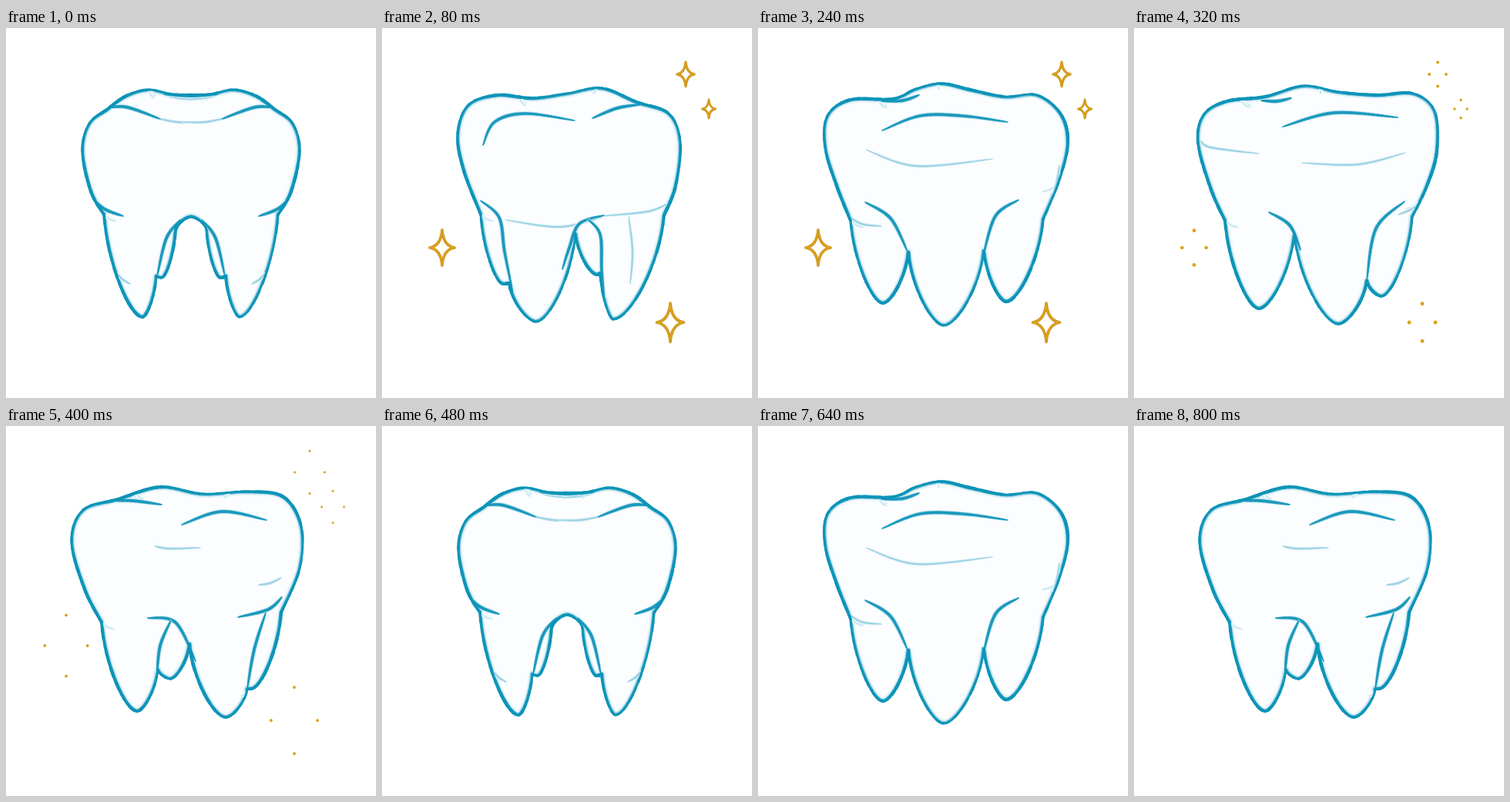
These frames come from a looping animation (480x480 px, 880 ms). An HTML page with a canvas:

```html
<!DOCTYPE html>
<html lang="en">
<head>
<meta charset="utf-8">
<title>Sparkling tooth</title>
<style>
html, body { margin: 0; width: 100%; height: 100%; overflow: hidden; background: #fff; }
canvas { display: block; width: 480px; height: 480px; }
</style>
</head>
<body>
<canvas id="stage" width="480" height="480"></canvas>
<script>
const ctx = document.getElementById('stage').getContext('2d');
const STEP = 80;
const TURN = 'front left quarter back right side front quarter back right side'.split(' ');
const PAPER = [251, 253, 255], TEAL = [14, 148, 184];
const GOLD = '#dca21c', GOLD_EDGE = '#c08a14';

// crown: key points from neck to neck over the top.
// feet: root tips and the gaps between them, right to left.
const POSES = {
  front: {
    mirror: true,
    crown: '127,242 110,212 99,160 108,124 132,105 156,88 185,80 215,86 240,87',
    feet: '240,245 220,262 202,324 195,322 177,375',
    folds: ['134,103 158,103 200,118', '226,249 208,273 196,322', '112,221 128,235 152,244',
      '205,86 240,88 275,86'],
    creases: ['190,116 222,122 250,122', '208,88 225,91 246,93', '144,318 151,326 161,332']
  },
  left: {
    crown: `128,242 106,185 98,138 112,100 150,87 195,91 240,85 285,78 330,96 372,111
      387,148 381,205 366,243`,
    feet: '300,378 283,318 279,320 251,267 200,381 165,331 157,332',
    folds: ['131,152 146,122 185,111 250,120', '273,117 305,104 337,99',
      '128,224 152,246 159,290 170,345', '288,243 256,254 243,285 234,313',
      '266,247 283,268 285,315 289,360'],
    creases: ['160,249 230,258 285,246', '285,244 345,238 372,227', '320,245 325,290 322,332']
  },
  quarter: {
    crown: `121,243 103,210 88,165 88,120 112,95 165,92 205,81 245,72 285,81 330,90 372,96
      396,130 394,182 372,240`,
    feet: '319,358 298,308 285,320 268,298 220,386 183,312 162,336',
    folds: ['157,185 163,143 190,119 270,115 318,103', '130,217 164,246 183,312',
      '329,225 287,245 268,300', '281,254 294,278 299,312'],
    creases: ['211,125 227,143 236,167', '359,105 366,123 367,143', '386,194 379,205 369,213']
  },
  back: {
    crown: `120,250 102,205 87,155 90,114 120,93 175,92 205,79 238,72 275,80 320,89 362,87
      393,112 402,150 390,200 370,248`,
    feet: '322,355 293,289 241,386 195,291 162,357',
    folds: ['139,226 172,247 194,290', '338,223 308,244 292,296',
      '161,133 210,114 265,114 324,122', '160,95 188,94 209,87'],
    creases: ['140,158 205,179 304,170', '115,242 134,254 160,257', '383,214 388,198 391,178']
  },
  right: {
    crown: `118,250 100,210 83,150 90,113 120,95 170,89 220,75 265,83 315,87 362,85 390,108
      393,160 380,205 361,245`,
    feet: '321,348 302,328 265,384 208,267 162,364',
    folds: ['175,239 202,256 216,288', '351,225 314,260 302,327', '193,128 260,110 342,116',
      '165,94 185,95 204,91'],
    creases: ['218,175 290,177 352,162', '86,146 100,155 162,163', '365,232 356,237 343,242']
  },
  side: {
    crown: `124,255 102,212 85,150 100,109 145,95 200,79 255,88 315,85 360,92 383,130
      381,185 357,242`,
    feet: '318,341 313,341 285,378 238,283 213,328 197,316 170,370',
    folds: ['184,249 220,255 246,305', '214,252 200,285 196,322', '228,128 280,111 338,122',
      '301,248 340,238 358,222', '337,242 322,290 313,341', '138,97 165,97 202,102'],
    creases: ['193,156 212,159 252,158', '328,206 342,204 357,197']
  }
};

// Sparkles: centre and half height.
const STARS = [[394, 60, 16], [424, 105, 12], [78, 285, 23], [374, 382, 25]];

const parse = text => text.trim().split(/\s+/).map(t => t.split(',').map(Number));
const flip = pts => pts.map(([x, y]) => [480 - x, y]);
const tint = a => `rgb(${PAPER.map((c, i) => Math.round(c + (TEAL[i] - c) * a))})`;

function random(seed) {
  return () => (seed = (seed * 16807) % 2147483647) / 2147483647;
}

function bezier(a, b, c, d) {
  return Array.from({ length: 16 }, (_, k) => {
    const t = k / 16, s = 1 - t;
    return [0, 1].map(j =>
      s * s * s * a[j] + 3 * s * s * t * b[j] + 3 * s * t * t * c[j] + t * t * t * d[j]);
  });
}

// Smooth open curve through all points.
function spline(pts) {
  const n = pts.length - 1, out = [];
  const at = i => pts[Math.max(0, Math.min(n, i))];
  for (let i = 0; i < n; i++) {
    const [a, b, c, d] = [at(i - 1), at(i), at(i + 1), at(i + 2)];
    out.push(...bezier(b, b.map((v, j) => v + (c[j] - a[j]) / 6),
      c.map((v, j) => v - (d[j] - b[j]) / 6), c));
  }
  return [...out, pts[n]];
}

// One flank of a root: steep at the top, level at the tip.
function flank([x, y], [tx, ty]) {
  const dx = tx - x, dy = ty - y;
  return bezier([x, y], [x + 0.08 * dx, y + 0.47 * dy], [tx - 0.33 * dx, ty], [tx, ty]);
}

function build({ mirror, crown, feet, folds, creases }) {
  let top = parse(crown), low = parse(feet);
  if (mirror) {
    top = [...top, ...flip(top.slice(0, -1)).reverse()];
    low = [...flip(low.slice(1)).reverse(), ...low];
  }
  const edge = spline(top);
  const stops = [top[top.length - 1], ...low, top[0]];
  for (let i = 1; i < stops.length; i += 2) {
    const [a, tip, b] = stops.slice(i - 1, i + 2);
    edge.push(...flank(a, tip), tip, ...flank(b, tip).reverse());
  }
  const lines = list => list.map(parse)
    .flatMap(p => mirror ? [p, flip(p)] : [p]).map(spline);
  return { edge, folds: lines(folds), creases: lines(creases) };
}

function trace(pts) {
  ctx.beginPath();
  for (const [x, y] of pts) ctx.lineTo(x, y);
}

// Soft brush line, thin at both ends.
function ink(pts, width, strength) {
  const n = pts.length - 1;
  for (const [grow, fade] of [[3, 0.15], [1.2, 0.5], [0, 1]]) {
    ctx.strokeStyle = tint(strength * fade);
    for (let i = 0; i < n; i++) {
      const swell = Math.sin(Math.PI * (i + 0.5) / n) ** 0.6;
      ctx.lineWidth = (width + grow) * (0.25 + 0.75 * swell);
      trace([pts[i], pts[i + 1]]);
      ctx.stroke();
    }
  }
}

function drawTooth({ edge, folds, creases }) {
  const rnd = random(71), n = edge.length;
  ctx.save();
  trace(edge);
  ctx.closePath();
  ctx.fillStyle = tint(0);
  ctx.fill();
  ctx.clip();
  for (const [w, a] of [[11, 0.05], [8, 0.16], [6, 0.4], [4.5, 0.7]]) {
    ctx.strokeStyle = tint(a);
    ctx.lineWidth = w;
    ctx.stroke();
  }
  // Stray brush marks running in from the rim.
  for (let i = 0; i < 7; i++) {
    const [x, y] = edge[Math.floor(rnd() * n)];
    const dx = (240 - x) * 0.14, dy = 6 + rnd() * 6;
    ink(spline([[x, y], [x + dx / 2, y + dy * 0.7], [x + dx, y + dy]]), 1.5, 0.2);
  }
  for (const line of creases) ink(line, 2, 0.4);
  for (const line of folds) ink(line, 3.4, 0.95);
  ctx.restore();

  // Rim of uneven thickness.
  ctx.strokeStyle = tint(1);
  edge.forEach((p, i) => {
    ctx.lineWidth = 3 + 0.6 * Math.sin(i / 9) + rnd() * 0.9;
    trace([p, edge[(i + 1) % n]]);
    ctx.stroke();
  });
}

const tips = ([x, y, h], spread = 1) =>
  [[0, -1], [0.7, 0], [0, 1], [-0.7, 0]].map(([u, v]) => [x + u * h * spread, y + v * h * spread]);

function drawStar(star) {
  const [x, y, h] = star, ends = tips(star);
  ctx.beginPath();
  ctx.moveTo(...ends[0]);
  ends.forEach(([a, b], i) => {
    const [c, d] = ends[(i + 1) % 4];
    ctx.quadraticCurveTo(x + (a + c - 2 * x) * 0.1, y + (b + d - 2 * y) * 0.1, c, d);
  });
  ctx.closePath();
  for (const [color, width] of [[GOLD_EDGE, 2.1 + h * 0.06], [GOLD, 1.2 + h * 0.05]]) {
    ctx.strokeStyle = color;
    ctx.lineWidth = width;
    ctx.stroke();
  }
}

function drawDots(star, spread, size) {
  ctx.fillStyle = GOLD;
  for (const [x, y] of tips(star, spread)) {
    ctx.beginPath();
    ctx.arc(x, y, (1.2 + star[2] * 0.05) * size, 0, 7);
    ctx.fill();
  }
}

const teeth = {};
for (const name in POSES) teeth[name] = build(POSES[name]);

function draw(step) {
  ctx.fillStyle = '#fff';
  ctx.fillRect(0, 0, 480, 480);
  ctx.lineCap = ctx.lineJoin = 'round';
  drawTooth(teeth[TURN[step]]);
  for (const star of STARS) {
    if (step >= 1 && step <= 3) drawStar(star);
    else if (step === 4) drawDots(star, 0.97, 1);
    else if (step === 5) drawDots(star, 1.72, 0.8);
  }
}

const start = performance.now();
let shown = 0;
draw(0);
function tick(now) {
  const step = Math.floor(Math.max(0, now - start) / STEP) % TURN.length;
  if (step !== shown) draw(shown = step);
  requestAnimationFrame(tick);
}
requestAnimationFrame(tick);
</script>
</body>
</html>
```
